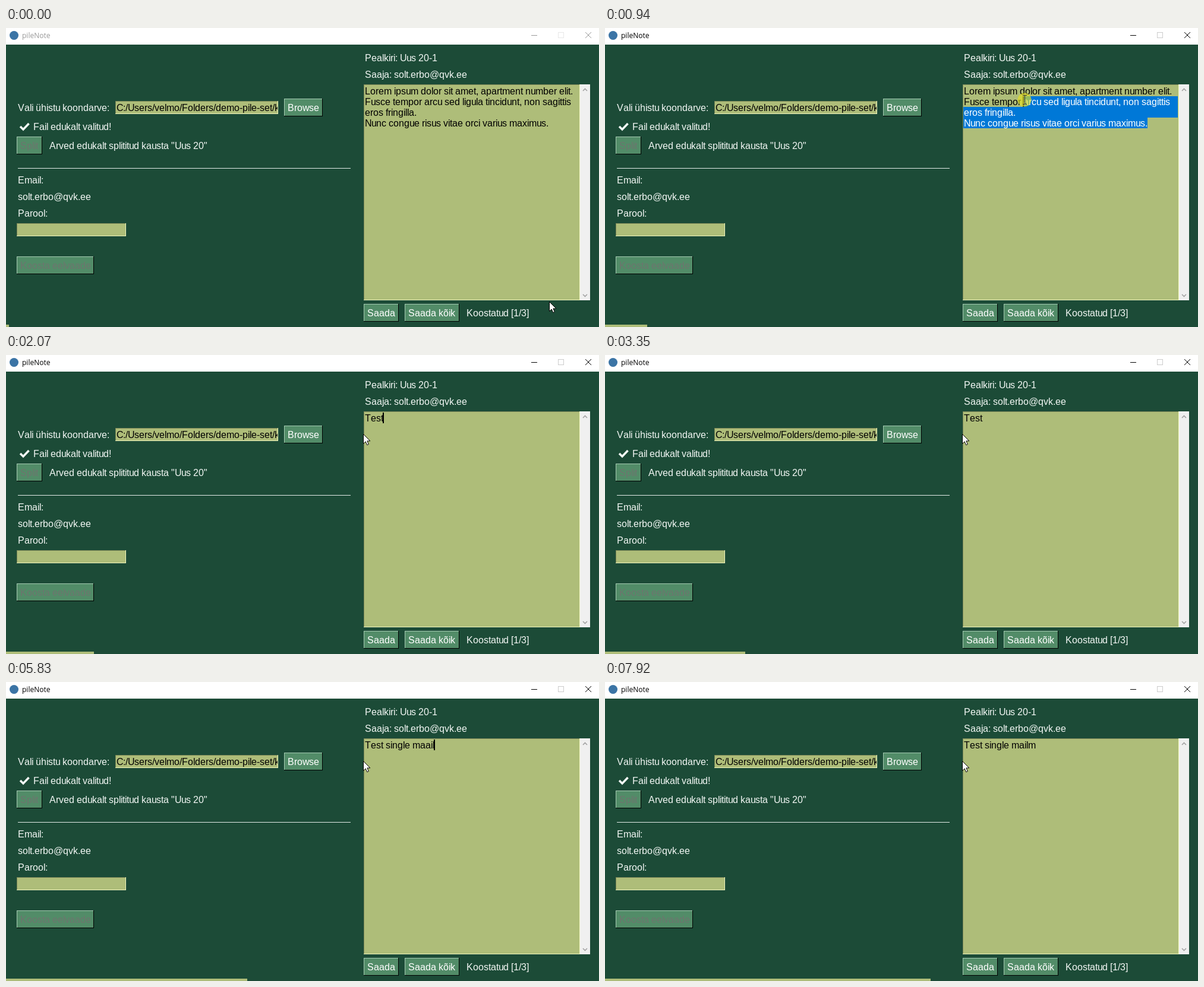
An HTML page with a canvas for the animation above (8 s loop, 998x504 px).

```html
<!DOCTYPE html>
<html lang="et">
<head>
<meta charset="utf-8">
<title>pileNote</title>
<style>
  html, body { margin: 0; width: 100%; height: 100%; overflow: hidden; background: #1c4b37; }
  canvas { display: block; }
</style>
</head>
<body>
<canvas id="stage" width="998" height="504"></canvas>
<script>
const ctx = document.getElementById('stage').getContext('2d');
const LOOP = 8000, STEP = 80;
const BG = '#1c4b37', FIELD = '#aebd79', BUTTON = '#528c68', LIGHT = '#f2f7f4', BLUE = '#0078d7';
const UI_FONT = '"Liberation Sans", Arial, sans-serif';
const EMAIL = 'solt.erbo@qvk.ee';
const LETTER = [
  'Lorem ipsum dolor sit amet, apartment number elit.',
  'Fusce tempor arcu sed ligula tincidunt, non sagittis',
  'eros fringilla.',
  'Nunc congue risus vitae orci varius maximus.'
];
const TEXT_X = 604, TEXT_Y = 97, LINE = 18;

// [time, x, y] of the pointer
const POINTER = [
  [0, 914, 461], [80, 914, 461], [360, 917, 162], [440, 915, 161], [800, 803, 160],
  [1120, 608, 82], [1280, 603, 75], [1360, 603, 75], [1600, 601, 133]
];
const PRESS = 440, RELEASE = 1400, REPLACE = 1690;

// [time, key], where '<' is backspace
const KEYS = [
  [1690, 'T'], [1840, 'e'], [1920, 's'], [2080, 't'], [2400, ' '],
  [3600, 's'], [3760, 'i'], [3920, 'n'], [4080, 'g'], [4240, 'l'], [4390, 'e'], [4470, ' '],
  [4640, 'm'], [4800, 'a'], [4880, 'a'], [4960, 'i'], [5110, 'l'],
  [6500, '<'], [6660, '<'], [6900, '<'], [7120, 'i'], [7280, 'l'], [7750, 'm']
];

// Whole-pixel glyph advances, as in hinted screen text
const advances = { u: 8 };
function advance(ch) {
  if (!(ch in advances)) {
    ctx.font = '1600px ' + UI_FONT;
    advances[ch] = Math.floor(ctx.measureText(ch).width / 100 + .4);
  }
  return advances[ch];
}
const textWidth = str => [...str].reduce((sum, ch) => sum + advance(ch), 0);

function text(str, x, baseline, color = LIGHT) {
  for (const ch of str) {
    const step = advance(ch);
    ctx.font = '16px ' + UI_FONT;
    ctx.fillStyle = color;
    ctx.fillText(ch, x, baseline);
    x += step;
  }
}

function rect(x, y, w, h, color) {
  ctx.fillStyle = color;
  ctx.fillRect(x, y, w, h);
}

function line(points, color, width = 1) {
  ctx.beginPath();
  points.forEach(([x, y]) => ctx.lineTo(x, y));
  ctx.strokeStyle = color;
  ctx.lineWidth = width;
  ctx.stroke();
}

function bevel(x, y, w, h, fill, topLeft, bottomRight) {
  rect(x, y, w, h, bottomRight);
  rect(x, y, w - 1, h - 1, topLeft);
  rect(x + 1, y + 1, w - 2, h - 2, fill);
}
const field = (x, y, w, h) => bevel(x, y, w, h, FIELD, '#7c8758', '#f0f6bd');

function button(label, x, y, w, enabled = true) {
  bevel(x, y, w, 30, BUTTON, '#a5cbb2', '#000');
  text(label, x + 6, y + 21, enabled ? '#fff' : '#6d756e');
}

function titleBar(active) {
  const ink = active ? '#000' : '#999';
  rect(0, 0, 998, 28, '#fff');
  ctx.fillStyle = '#3b74a5';
  ctx.beginPath();
  ctx.arc(13.5, 12.5, 7.5, 0, 7);
  ctx.fill();
  ctx.font = '12px "Open Sans", "Noto Sans", sans-serif';
  ctx.fillStyle = ink;
  ctx.fillText('pileNote', 27, 17);
  rect(884, 12, 10, 1, ink);
  ctx.strokeStyle = active ? '#ccc' : '#e8e8e8';
  ctx.lineWidth = 1;
  ctx.strokeRect(929.5, 7.5, 9, 9);
  line([[975, 7], [985, 17]], ink);
  line([[985, 7], [975, 17]], ink);
}

function form() {
  text('Vali ühistu koondarve:', 20, 140);
  field(184, 123, 274, 22);
  ctx.save();
  ctx.beginPath();
  ctx.rect(186, 124, 271, 20);
  ctx.clip();
  text('C:/Users/velmo/Folders/demo-pile-set/koond', 186, 140, '#000');
  ctx.restore();
  button('Browse', 468, 119, 65);
  line([[24, 166], [29, 171], [38.5, 161]], LIGHT, 3.6);
  text('Fail edukalt valitud!', 46, 172);
  button('Split', 18, 183, 43, false);
  text('Arved edukalt splititud kausta "Uus 20"', 73, 204);
  rect(20, 236, 560, 1, '#e3ece7');
  text('Email:', 20, 262);
  text(EMAIL, 20, 290);
  text('Parool:', 20, 318);
  field(18, 329, 184, 22);
  button('Koosta eelvaade', 18, 385, 130, false);
}

function mailPanel() {
  text('Pealkiri: Uus 20-1', TEXT_X, 56);
  text('Saaja: ' + EMAIL, TEXT_X, 84);
  field(602, 95, 364, 364);
  rect(966, 95, 17, 364, '#f0f0f0');
  line([[971, 106], [974.5, 102.5], [978, 106]], '#a3a3a3', 1.6);
  line([[971, 449], [974.5, 452.5], [978, 449]], '#a3a3a3', 1.6);
  button('Saada', 602, 465, 59);
  button('Saada kõik', 671, 465, 92);
  text('Koostatud [1/3]', 775, 486);
}

function pointerAt(time) {
  const next = POINTER.findIndex(p => p[0] > time);
  if (next < 0) return POINTER[POINTER.length - 1].slice(1);
  const [t0, x0, y0] = POINTER[next - 1], [t1, x1, y1] = POINTER[next];
  const k = (time - t0) / (t1 - t0);
  return [x0 + (x1 - x0) * k, y0 + (y1 - y0) * k];
}

function caret(x, row) {
  rect(x - 1, TEXT_Y + row * LINE, 2, LINE, '#000');
}

function letterBody(time, blinkOn) {
  LETTER.forEach((str, row) => text(str, TEXT_X, TEXT_Y + 15 + row * LINE, '#000'));
  if (time < PRESS) return;

  const [px, py] = pointerAt(Math.min(time, 1360));
  const row = Math.max(0, Math.min(3, Math.floor((py - TEXT_Y) / LINE)));
  let index = 0, startX = TEXT_X;
  for (const ch of LETTER[row]) {
    if (startX + advance(ch) / 2 > px) break;
    startX += advance(ch);
    index++;
  }
  for (let r = row; r < 4; r++) {
    const x = r === row ? startX : TEXT_X;
    const str = r === row ? LETTER[r].slice(index) : LETTER[r];
    const left = x === TEXT_X ? 603 : x;
    const right = r < 3 ? 964 : TEXT_X + textWidth(LETTER[r]);
    rect(left, TEXT_Y + r * LINE, right - left, LINE, BLUE);
    text(str, x, TEXT_Y + 15 + r * LINE, '#fff');
  }
  if (blinkOn) caret(startX, row);
}

function typedBody(time, blinkOn) {
  let str = '';
  for (const [at, key] of KEYS) {
    if (at <= time) str = key === '<' ? str.slice(0, -1) : str + key;
  }
  text(str, TEXT_X, TEXT_Y + 15, '#000');
  if (blinkOn) caret(TEXT_X + textWidth(str), 0);
}

function pointer(time) {
  const [x, y] = pointerAt(time).map(Math.round);
  if (time >= PRESS && time < RELEASE) {
    ctx.beginPath();
    ctx.arc(x, y, 11.5, 0, 7);
    ctx.fillStyle = 'rgba(228,222,30,.65)';
    ctx.fill();
  }
  if (x > 602 && x < 966 && y > 95 && y < 459) {
    rect(x, y - 8, 1, 16, '#333');
    rect(x - 3, y - 8, 7, 1, '#333');
    rect(x - 3, y + 7, 7, 1, '#333');
    return;
  }
  ctx.save();
  ctx.translate(x + .5, y + .5);
  const arrow = new Path2D('M0 0V16L3.7 12.5L6.2 18.2L8.8 17L6.4 11.4H11.4Z');
  ctx.fillStyle = '#fff';
  ctx.fill(arrow);
  ctx.strokeStyle = '#000';
  ctx.lineWidth = 1;
  ctx.stroke(arrow);
  ctx.restore();
}

function draw(now) {
  const step = Math.min(99, Math.floor((now % LOOP + 20) / STEP));
  const time = step * STEP;
  const blinkOn = time < 800 || (time - 800) % 900 < 600;
  rect(0, 0, 998, 504, BG);
  titleBar(time >= PRESS);
  form();
  mailPanel();
  (time < REPLACE ? letterBody : typedBody)(time, blinkOn);
  rect(0, 500, Math.round(5.4 + 5.485 * step), 4, FIELD);
  pointer(time);
}

function tick() {
  draw(performance.now());
  requestAnimationFrame(tick);
}
tick();
</script>
</body>
</html>
```
